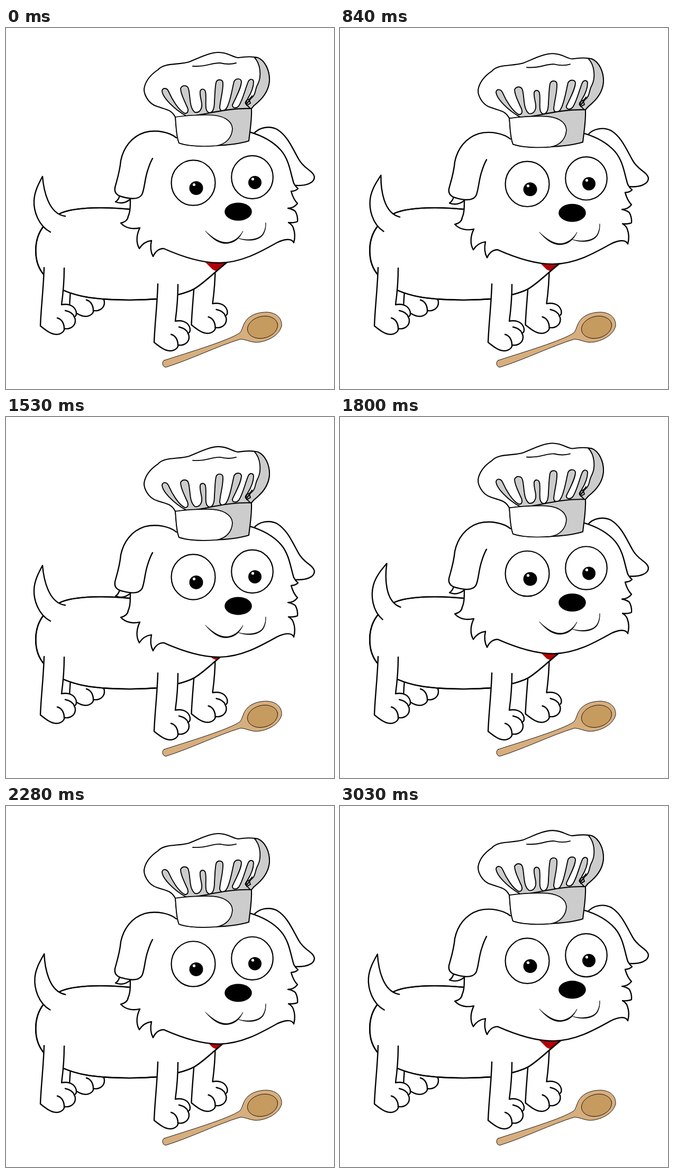
An HTML page with a canvas for the animation above (3.06 s loop, 620 px wide and 681 px high).

```html
<!DOCTYPE html>
<html lang="en">
<head>
<meta charset="utf-8">
<title>Chef dog</title>
<style>
  html, body { margin: 0; width: 100%; height: 100%; overflow: hidden; background: #fff; }
  canvas { display: block; }
</style>
</head>
<body>
<canvas id="stage" width="620" height="681"></canvas>
<script>
const ctx = document.getElementById('stage').getContext('2d');
const LOOP = 3060, STEP = 30, BOB = 10, BOB_MS = 1000, WAG = 15 * Math.PI / 180;
// Turning points of the wagging tail, alternately low and high
const wagTurns = [0, 385, 660, 1100, 1540, 1900, 2200, 2530, 3140];
const shape = d => new Path2D(d);

const body = shape(`M245 343 C190 337 130 337 102 350 C90 355 78 365 71 374
  C52 398 50 442 73 467 C82 480 94 489 109 495 C135 506 160 510 195 512
  C230 514 262 513 287 511 C305 508 338 502 356 492 C372 483 392 463 414 445 L430 432`);
const scarf = shape('M372 437 L387 452 Q392 458 398 458 L414 445 L416 432 Z');
const tail = shape('M84 385 C61 373 52 345 53 325 C54 308 62 293 69 280 C71 305 80 351 112 355');

const leg = shape(`M72 452 C71 490 66 530 65 562 C75 570 85 578 95 578
  C104 578 111 572 110 567 C122 569 131 562 131 552 Q131 548 129 545
  C134 543 134 536 131 531 C126 522 115 520 105 522 C108 500 110 480 110 453`);
const toes = shape('M97 547 C105 549 110 557 110 567 M112 533 C122 535 127 539 129 545');

const rightEar = shape(`M468 200 C478 187 498 184 512 191 C532 203 541 226 553 247
  C563 266 581 269 583 281 C583 292 568 298 548 297`);
const skull = shape(`M460 196 C484 203 506 215 520 231 C536 250 538 275 544 293
  Q547 299 552 303 Q547 308 539 308 Q543 323 551 331 Q544 340 533 340
  Q543 342 547 346 Q552 355 551 365 Q545 368 534 367 Q541 371 543 377
  Q548 390 544 405 C540 396 526 398 512 405 C478 424 445 442 405 443
  C370 444 332 431 298 416 Q285 416 278 431 Q271 418 275 401
  Q260 403 252 416 C245 404 247 389 253 377 C240 380 226 378 217 368
  Q230 365 231 355 C235 347 235 335 235 320`);
const earHair = shape('M215 316 Q213 324 207 328 Q223 334 236 322');
const leftEar = shape(`M322 207 C310 197 285 191 262 197 C237 205 222 226 217 250
  C215 273 208 292 206 301 C204 312 212 317 222 319 C237 323 251 324 257 314
  C262 304 262 285 268 268 Q272 255 277 246`);
const mouth = shape(`M377 383 C392 401 407 409 421 406 C434 404 442 396 448 383
  C442 393 434 401 421 404 C407 406 394 399 377 383 Z
  M440 397 C456 403 477 402 486 390 Q492 380 491 367 Q491 380 485 389 C476 400 456 401 440 397 Z`);

const puff = shape(`M320 168 C312 153 302 154 286 148 C268 143 258 122 262 110
  C266 96 278 85 287 79 C299 65 326 70 346 64 C364 57 384 46 402 46
  C420 46 430 56 439 56 C452 54 464 53 476 56 C490 62 498 80 498 98
  C497 118 485 132 476 140 Q468 146 463 153 L430 180 L340 190 Z`);
const puffShade = shape(`M469 55 C482 68 483 92 476 106 C470 116 473 126 463 133
  L452 147 L463 153 Q468 146 476 140 C485 132 497 118 498 98 C498 80 490 62 476 56 Z`);
const folds = shape(`M341 166 C317 153 295 130 295 118 C297 112 304 113 307 119
  C314 135 326 155 338 161 C346 161 345 153 341 146 C336 134 330 124 330 114
  C333 107 343 107 345 115 C349 130 346 150 357 159 C366 161 371 152 370 143
  C369 134 366 128 367 119 C369 114 375 114 377 120 C380 135 373 158 385 160
  C393 159 394 148 394 138 C395 125 395 112 397 103 C399 96 409 96 410 103
  C411 118 405 135 404 150 C405 159 414 158 418 149 C424 138 427 118 431 101
  C435 94 444 95 445 101 C445 112 435 130 428 145 C427 152 436 152 440 147
  C448 135 452 115 458 101 C461 95 467 96 468 101 C468 112 462 125 457 133
  L453 143 L463 153 C430 152 402 157 375 164 Z`);
const squiggle = shape('M465 128 Q461 135 455 136 Q450 143 455 143 L460 136 L462 142 L455 146');
const crease = shape('M353 72 C380 74 388 65 405 66 C417 69 425 69 435 66');
const band = shape(`M320 168 C345 169 364 164 381 161 C410 155 440 151 464 152
  C465 174 461 194 459 213 C430 222 355 227 327 217 C321 201 322 184 320 168 Z`);
const bandFront = shape(`M320 168 C340 165 360 164 382 164 C410 164 427 174 428 190
  C427 207 416 219 398 222 C372 224 345 223 327 217 C321 201 322 184 320 168 Z`);

const spoon = shape(`M299 627 C345 612 420 590 442 575 C448 568 447 558 457 548
  C467 539 480 536 493 536 C512 537 522 548 521 562 C516 582 490 593 472 593
  C460 592 452 587 443 587 C400 600 350 625 302 640 C295 639 294 629 299 627 Z`);

function draw(path, fill = '#fff', width = 2.4) {
  if (fill) { ctx.fillStyle = fill; ctx.fill(path); }
  if (width) { ctx.lineWidth = width; ctx.stroke(path); }
}

function oval(x, y, rx, ry, fill, width = 0, turn = 0) {
  const p = new Path2D();
  p.ellipse(x, y, rx, ry, turn, 0, Math.PI * 2);
  draw(p, fill, width);
}

function shifted(dx, dy, paint) {
  ctx.save();
  ctx.translate(dx, dy);
  paint();
  ctx.restore();
}

const drawLeg = (dx, dy) => shifted(dx, dy, () => { draw(leg); draw(toes, null); });

function drawEye(x, y, rx, ry, px, py, r) {
  oval(x, y, rx, ry, '#fff', 2.2);
  oval(px, py, r, r, '#000');
  oval(px - 4, py - 6.5, 2.6, 2.6, '#fff');
}

function drawHat() {
  const grey = '#ccc';
  draw(puff, '#fff', 2.1);
  draw(puffShade, grey, 1.9);
  draw(folds, grey, 1.9);
  draw(squiggle, null, 1.9);
  draw(crease, null, 1.9);
  draw(band, grey, 2.1);
  draw(bandFront, '#fff', 1.7);
}

function drawHead() {
  draw(rightEar);
  draw(skull);
  draw(earHair);
  draw(leftEar);
  drawHat();
  drawEye(354, 292, 41.5, 42.7, 359.5, 302, 13);
  drawEye(465.5, 281.5, 39.3, 40.7, 470.5, 291.5, 12.5);
  oval(439, 346.5, 25.8, 17, '#000');
  draw(mouth, '#000', 0.7);
}

function drawSpoon() {
  draw(spoon, '#d7ae7e', 0.9);
  oval(485, 564.5, 29, 20.5, '#c69b5f', 0.9, -0.25);
}

function wagAt(t) {
  const i = wagTurns.findIndex((end, k) => k && t < end) - 1;
  const p = (t - wagTurns[i]) / (wagTurns[i + 1] - wagTurns[i]);
  const rise = (1 - Math.cos(Math.PI * p)) / 2;
  return WAG * (i % 2 ? 1 - rise : rise);
}

function drawTail(angle) {
  ctx.save();
  ctx.translate(96, 368);
  ctx.rotate(angle);
  ctx.translate(-96, -368);
  draw(tail);
  ctx.restore();
}

function render(t) {
  ctx.fillStyle = '#fff';
  ctx.fillRect(0, 0, 620, 681);
  ctx.strokeStyle = '#000';
  ctx.lineCap = ctx.lineJoin = 'round';
  drawLeg(55, -34);
  drawLeg(285.5, -2);
  draw(body);
  draw(scarf, '#b30006', 0);
  draw(body, null);
  drawTail(wagAt(t));
  drawLeg(0, 0);
  drawLeg(215, 31);
  drawSpoon();
  shifted(0, BOB * (1 - Math.cos(2 * Math.PI * t / BOB_MS)) / 2, drawHead);
}

const start = performance.now();
function tick() {
  const t = (performance.now() - start) % LOOP;
  render(Math.floor(t / STEP) * STEP);
  requestAnimationFrame(tick);
}
tick();
</script>
</body>
</html>
```
